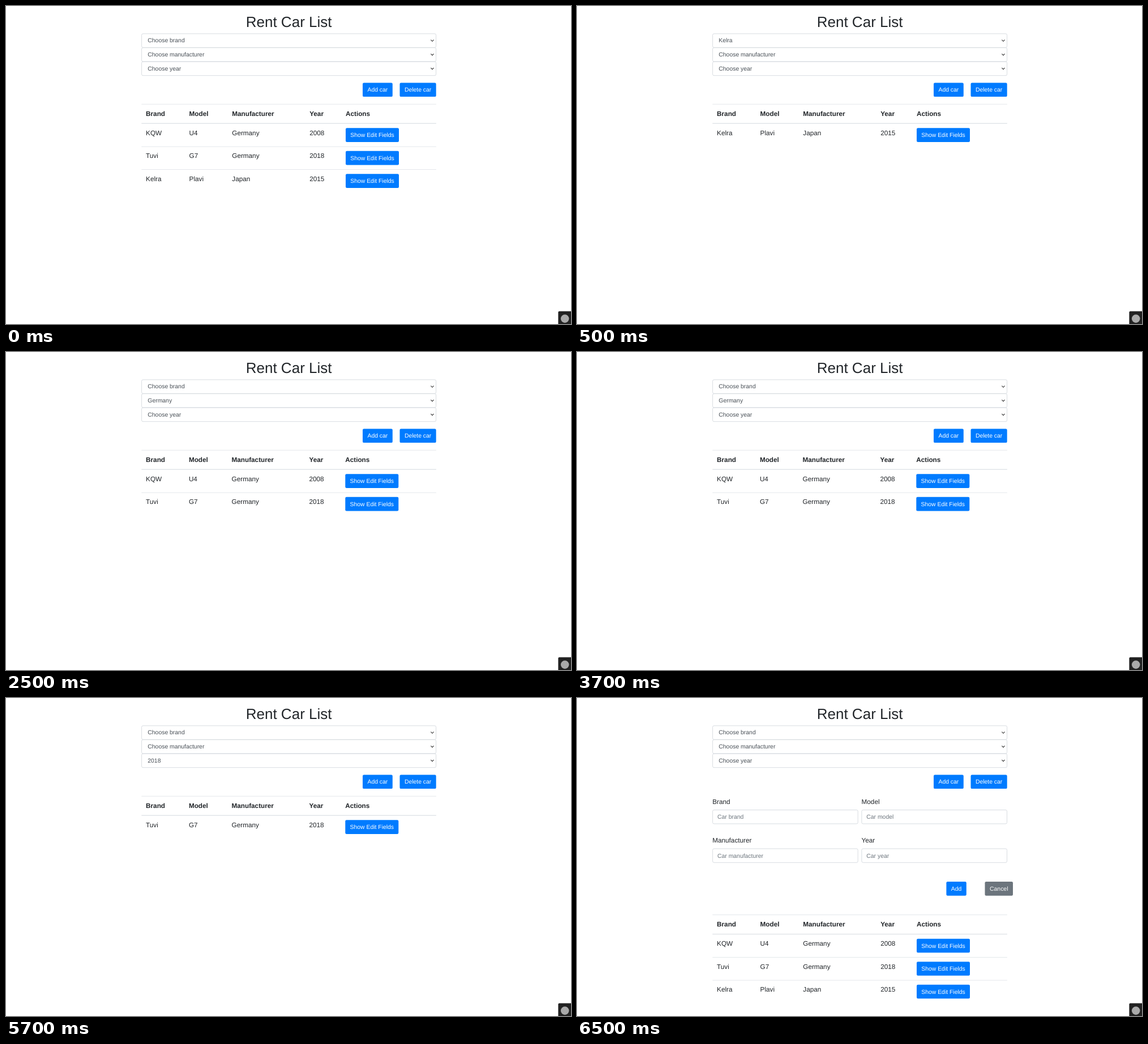
An HTML page that plays this animation: 998 px wide and 561 px high, repeating every 8000 ms.

```html
<!DOCTYPE html>
<html lang="en">
<head>
<meta charset="utf-8">
<title>Rent Car List</title>
<style>
  html, body { margin: 0; width: 100%; height: 100%; overflow: hidden; background: #fff; }
  svg { display: block; width: 998px; height: 561px; }
  text { font: 10.42px "Liberation Sans", Arial, sans-serif; fill: #212529; text-rendering: geometricPrecision; }
  .title { font-size: 26.04px; text-anchor: middle; }
  .cell { font-size: 11.72px; }
  .head { font-size: 11.72px; font-weight: bold; }
  .value { fill: #495057; }
  .hint { fill: #6c757d; }
  .label { fill: #fff; text-anchor: middle; }
  .box { fill: #fff; stroke: #ced4da; stroke-width: .8; }
  .arrow { fill: none; stroke: #333; stroke-width: 1.1; }
</style>
</head>
<body>
<svg id="stage" viewBox="0 0 998 561"></svg>
<script>
const stage = document.getElementById("stage");
const cars = [
  ["KQW", "U4", "Germany", "2008"],
  ["Tuvi", "G7", "Germany", "2018"],
  ["Kelra", "Plavi", "Japan", "2015"]
];
const prompts = ["Choose brand", "Choose manufacturer", "Choose year"];
const columns = [247.1, 323.6, 399.3, 536.2, 600];

// filter: [select index, car field]; tight: narrower first column
const scenes = [
  { until: 500 },
  { until: 2500, filter: [0, 0], match: "Kelra" },
  { until: 4500, filter: [1, 2], match: "Germany", tight: true },
  { until: 6500, filter: [2, 3], match: "2018", tight: true },
  { until: 8000, form: true }
];

const text = (x, y, s, type) => `<text x="${x}" y="${y}" class="${type}">${s}</text>`;
const box = (x, y, w) => `<rect x="${x}" y="${y}" width="${w}" height="24.4" rx="2.4" class="box"/>`;
const line = (y, h, color) => `<rect x="239.3" y="${y}" width="520.6" height="${h}" fill="${color}"/>`;
const button = (x, y, w, s, color = "#007bff") =>
  `<rect x="${x}" y="${y}" width="${w}" height="24.6" rx="2.2" fill="${color}"/>` +
  text(x + w / 2, y + 15.9, s, "label");

function select(i, s) {
  const y = 48.9 + i * 24.7;
  return box(239.6, y, 520) + text(250.3, y + 15.3, s, "value") +
    `<path class="arrow" d="M750.4 ${y + 10.8}l2.6 2.6 2.6-2.6"/>`;
}

function field(x, y, name, hint) {
  return text(x - .3, y, name, "cell") + box(x, y + 10.5, 256.6) + text(x + 8.4, y + 26.4, hint, "hint");
}

const form = () =>
  field(239.6, 187, "Brand", "Car brand") +
  field(502.9, 187, "Model", "Car model") +
  field(239.6, 255.4, "Manufacturer", "Car manufacturer") +
  field(502.9, 255.4, "Year", "Car year") +
  button(652.4, 324.1, 35.4, "Add") +
  button(720.5, 324.1, 49.5, "Cancel", "#6c757d");

function table(rows, top, tight) {
  const xs = columns.map((x, i) => tight && i ? x - .7 : x);
  let out = line(top, .8, "#dee2e6") + line(top + 33.7, 1.3, "#dee2e6");
  ["Brand", "Model", "Manufacturer", "Year", "Actions"].forEach((s, i) => {
    out += text(xs[i], top + 20.7, s, "head");
  });
  rows.forEach((car, r) => {
    const y = top + 34.4 + r * 40.5;
    if (r) out += line(y, .8, "#dee2e6");
    car.forEach((s, i) => { out += text(xs[i], y + 20.6, s, "cell"); });
    out += button(xs[4], y + 8.1, 94, "Show Edit Fields");
  });
  return out;
}

function draw({ filter, match, tight, form: open }) {
  const rows = filter ? cars.filter(car => car[filter[1]] === match) : cars;
  stage.innerHTML =
    text(499.6, 36.6, "Rent Car List", "title") +
    prompts.map((s, i) => select(i, filter && filter[0] === i ? match : s)).join("") +
    button(630, 135.5, 52.8, "Add car") +
    button(695.5, 135.5, 64.2, "Delete car") +
    (open ? form() : "") +
    table(rows, open ? 382.2 : 172.8, tight) +
    `<path d="M975.4 561V540.6q0-2 2-2H998V561z" fill="#222"/>` +
    `<circle cx="987.2" cy="551.6" r="7.3" fill="#aaa"/>`;
}

let shown;
function tick(now) {
  const scene = scenes.find(s => now % 8000 < s.until);
  if (scene !== shown) draw(shown = scene);
  requestAnimationFrame(tick);
}
tick(performance.now());
</script>
</body>
</html>
```
